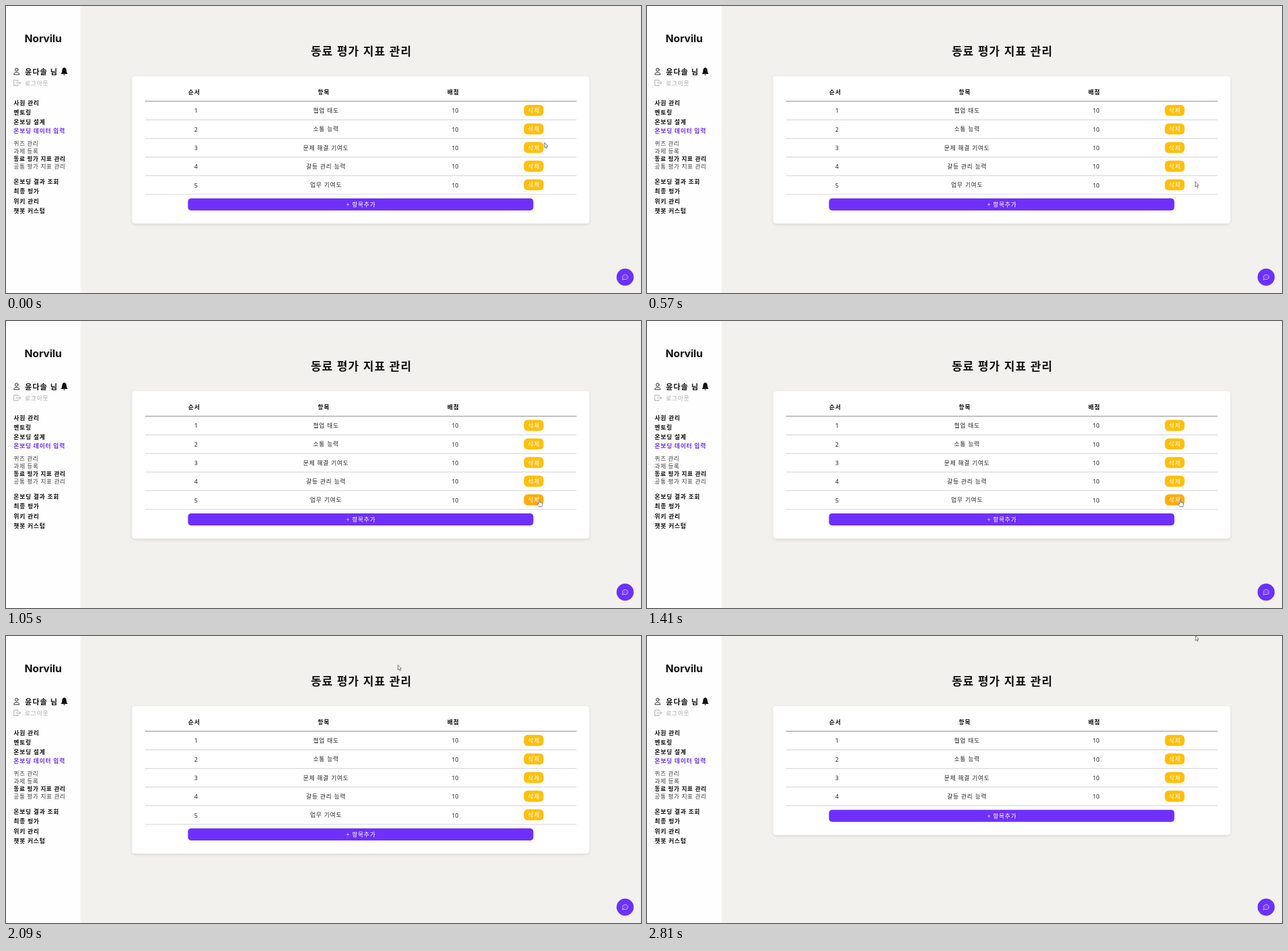
An HTML page that plays this animation: 1000x452 px, repeating every 2.84 s.

```html
<!DOCTYPE html>
<html lang="ko">
<head>
<meta charset="utf-8">
<style>
  html, body { margin: 0; width: 100%; height: 100%; overflow: hidden; background: #f3f1ed; }
  svg { display: block; width: 100%; height: 100%; }
  text { font: 9.3px "Noto Sans CJK KR", "Noto Sans CJK", sans-serif; letter-spacing: .75px; fill: #222; white-space: pre; }
  .mid { text-anchor: middle; }
  .num { font-family: "Noto Sans", sans-serif; letter-spacing: .1px; }
  .sub { font-size: 9.2px; letter-spacing: .58px; fill: #444; }
  .bold { font-weight: 700; fill: #111; }
  .on { fill: #6c2cfb; }
  .faint { fill: #aaa; }
  .white { fill: #fff; }
  .title { font-size: 18px; letter-spacing: 1.05px; }
  .user { font-size: 11.8px; letter-spacing: 1.05px; }
  .brand { font: 700 16.6px Inter, sans-serif; letter-spacing: -.1px; }
  .icon { fill: none; stroke: #222; stroke-linecap: round; stroke-linejoin: round; }
  .cursor { fill: #fff; stroke: #555; stroke-width: .8; stroke-linejoin: round; }
</style>
</head>
<body>
<svg viewBox="0 0 1000 452">
  <defs>
    <filter id="shadow" x="-5%" y="-5%" width="110%" height="115%">
      <feDropShadow dx="0" dy="1.5" stdDeviation="2" flood-opacity=".13"/>
    </filter>
  </defs>
  <rect width="1000" height="452" fill="#f3f1ed"/>
  <rect width="117.5" height="452" fill="#fefefe"/>
  <text class="bold brand mid" x="58.5" y="57">Norvilu</text>
  <g class="icon">
    <circle cx="16.7" cy="100.3" r="2.4"/>
    <path d="M12.4 107.6C12.4 103.2 21 103.2 21 107.6Z"/>
    <path stroke="#aaa" d="M19 118.5V116.8H12.3V125.4H19V123.7M16 121.1H23M21 119.2L23 121.1L21 123"/>
  </g>
  <path fill="#111" d="M91.8 97C88.6 97.6 88.4 100.4 88.2 103C88 105 87.2 106 86.4 107H97.2C96.4 106 95.6 105 95.4 103C95.2 100.4 95 97.6 91.8 97ZM90.2 107.8H93.4Q91.8 110.4 90.2 107.8Z"/>
  <text class="bold user" x="29.8" y="107.5">윤다솔 님</text>
  <text class="faint" x="29.8" y="124.7">로그아웃</text>
  <g id="menu"></g>
  <text class="bold title mid" x="559.5" y="78.3">동료 평가 지표 관리</text>
  <rect id="card" x="198.5" y="110.5" width="720" height="232" rx="4.5" fill="#fff" filter="url(#shadow)"/>
  <g id="table"></g>
  <g id="add">
    <rect x="286.5" y="303" width="544" height="19" rx="5" fill="#6f30fc"/>
    <text class="white mid" x="559" y="316">+ 항목추가</text>
  </g>
  <circle cx="975" cy="427" r="13.5" fill="#6c31fa"/>
  <path class="icon" style="stroke:#fff;stroke-width:.7" d="M970.8 430.8L971.3 428.6A4.3 3.8 0 1 1 973.2 430.3ZM973.3 427h.1m1.8 0h.1m1.8 0h.1"/>
  <path id="arrow" class="cursor" d="M0 0V8.2L1.8 6.6L3 9.3L4.3 8.7L3.1 6.1H5.4Z"/>
  <path id="hand" class="cursor" d="M-.8 .7Q0-.6 .8 .7V4L2.2 4.2L3.6 4.6L5 5.2Q5.5 8 4.3 11H-.4Q-2.4 8.6-3 6.8Q-2.2 5.6-.8 7Z"/>
</svg>
<script>
const LOOP = 2840, ROW = 29.3, CARD_HEIGHT = 232, DELETED_AT = 2210;
const $ = id => document.getElementById(id);
const text = (x, y, cls, s) => `<text x="${x}" y="${y}" class="${cls}">${s}</text>`;
const line = (y, color, width) => `<path d="M219 ${y}H898.5" stroke="${color}" stroke-width="${width}"/>`;

// An asterisk marks the current page
const menuGroup = (top, pitch, cls, current, labels) => labels.map((label, i) =>
  text(12.1, top + i * pitch, label[0] === '*' ? `${cls} ${current}` : cls, label.replace('*', ''))).join('');

$('menu').innerHTML =
  menuGroup(155.7, 14.9, 'bold', 'on', ['사원 관리', '멘토링', '온보딩 설계', '*온보딩 데이터 입력']) +
  menuGroup(220.3, 11.9, 'sub', 'bold', ['퀴즈 관리', '과제 등록', '*동료 평가 지표 관리', '공통 평가 지표 관리']) +
  menuGroup(280.3, 15.1, 'bold', '', ['온보딩 결과 조회', '최종 평가', '위키 관리', '챗봇 커스텀']);

const row = (name, i) => {
  const y = 164.5 + i * ROW;
  return `<g id="row${i}">
    ${text(299.3, y + 3.9, 'num mid', i + 1)}
    ${text(504, y + 3.6, 'mid', name)}
    ${text(707.3, y + 3.9, 'num mid', 10)}
    <rect id="del${i}" x="815.5" y="${y - 8.8}" width="31" height="17.3" rx="6" fill="#ffbf0b"/>
    ${text(831.4, y + 3.5, 'white mid', '삭제')}
    ${line(y + 14.8, '#d8d8dc', 1.2)}
  </g>`;
};
$('table').innerHTML =
  ['순서', '항목', '배점'].map((s, i) => text(296.4 + 204 * i, 139.1, 'bold mid', s)).join('') +
  line(150, '#aaa', 1.4) +
  ['협업 태도', '소통 능력', '문제 해결 기여도', '갈등 관리 능력', '업무 기여도'].map(row).join('');

// Pointer moves; it rests between them
const home = { x: 848, y: 215 };
const moves = [
  { from: 30, to: 260, x: 893.7, y: 270.5 },
  { from: 370, to: 810, x: 847.7, y: 279.7 },
  { from: 850, to: 1050, x: 839.6, y: 281.5 },
  { from: 1430, to: 1770, x: 617.3, y: 45.5 },
  { from: 2150, to: 2370, x: 692.6, y: 188.7 },
  { from: 2470, to: 2810, x: 863.7, y: -1 }
];
const easeOut = k => Math.sin(Math.min(1, Math.max(0, k)) * Math.PI / 2);

function pointer(t) {
  return moves.reduce((p, m) => {
    const k = easeOut((t - m.from) / (m.to - m.from));
    return { x: p.x + (m.x - p.x) * k, y: p.y + (m.y - p.y) * k };
  }, home);
}

function draw() {
  const t = (performance.now() - start) % LOOP;
  const { x, y } = pointer(t);
  const deleted = t >= DELETED_AT;
  const hover = !deleted && Math.abs(x - 831) < 15.5 && Math.abs(y - 281.6) < 8.6;
  const shift = deleted ? -ROW : 0;
  $('row4').style.display = deleted ? 'none' : '';
  $('card').setAttribute('height', CARD_HEIGHT + shift);
  $('add').setAttribute('transform', `translate(0 ${shift})`);
  $('del4').setAttribute('fill', hover ? '#ffac0c' : '#ffbf0b');
  for (const [id, visible] of [['arrow', !hover], ['hand', hover]]) {
    $(id).style.display = visible ? '' : 'none';
    $(id).setAttribute('transform', `translate(${x} ${y})`);
  }
  requestAnimationFrame(draw);
}
const start = performance.now();
draw();
</script>
</body>
</html>
```
